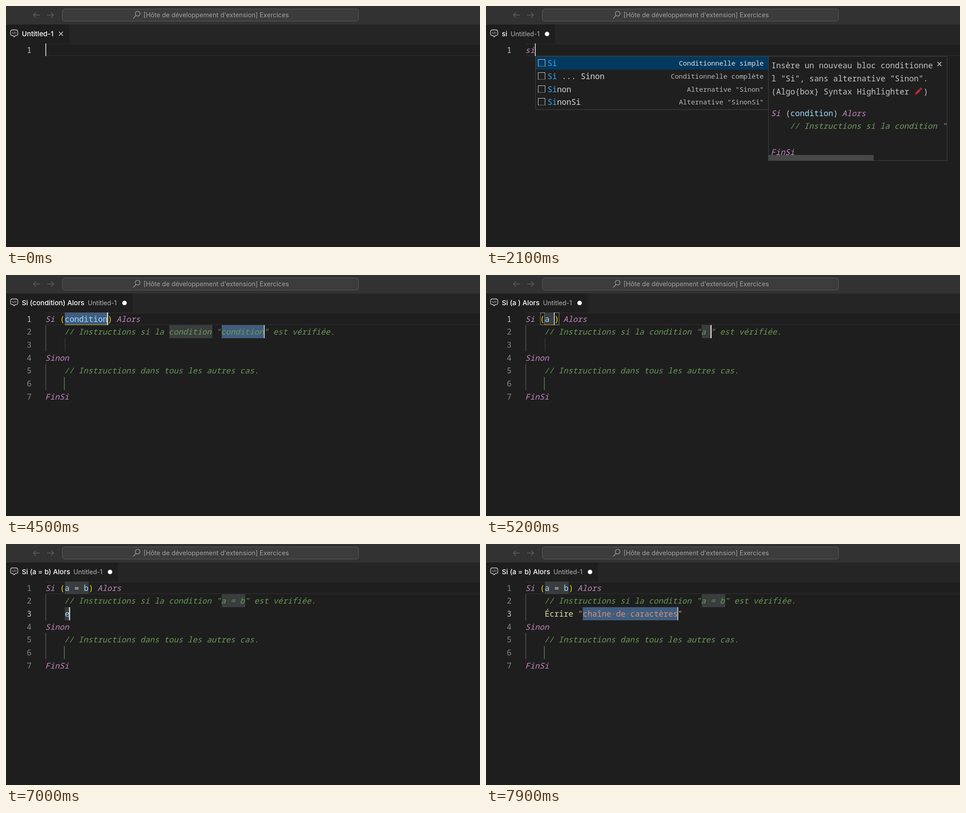
Write an HTML page that moves like this. It is 1048 px wide and 534 px high and loops after 8 s.

```html
<!DOCTYPE html>
<html lang="fr">
<head>
<meta charset="utf-8">
<title>Si … Sinon</title>
<style>
  html, body { margin: 0; width: 100%; height: 100%; overflow: hidden; background: #1e1e1e; }
  body { position: relative; font: 17.5px/28.7px "Noto Sans Mono", monospace; color: #d4d4d4; }
  div { position: absolute; box-sizing: border-box; white-space: pre; }
  svg { position: absolute; left: 0; top: 0; fill: none; }
  .bar { left: 0; top: 0; width: 1048px; height: 41px; background: #323233; }
  .search { left: 124px; top: 6px; width: 656px; height: 28px; border: 1px solid #5a5a5a; border-radius: 6px;
    background: #3c3c3c; padding-left: 179px; font: 14.2px/26px Inter, sans-serif; color: #a2a2a2; }
  .tabs { left: 0; top: 41px; width: 1048px; height: 42px; background: #252526; }
  .tab { left: 0; top: 0; height: 42px; padding: 0 12px 0 35px; background: #1e1e1e; display: flex;
    align-items: center; font: 450 15.2px/42px Inter, sans-serif; color: #fff; }
  .tab small { font-size: 14.1px; font-weight: 400; color: #b4b4b4; margin-left: 7.5px; }
  .tab svg { position: static; margin-left: 11px; }
  .current { border: solid #282828; border-width: 2px 0; }
  .num { text-align: right; color: #858585; }
  .on { color: #c6c6c6; }
  .k, .c { font-style: italic; font-weight: 500; position: relative; left: -1.2px; }
  .k { color: #c586c0; }
  .c { color: #6a9955; }
  .docs .c { color: #739c60; }
  .v { color: #9cdcfe; font-style: normal; }
  .f { color: #dcdcaa; font-style: normal; }
  .s { color: #ce9178; font-style: normal; }
  .p { font-style: normal; }
  .code .p { color: #ffd700; }
  .dot { color: #7d7f86; font-style: normal; }
  .field { background: #3a3d3e; }
  .picked { background: #405d7e; }
  .guide { background: #454545; }
  .stop { background: #4b6b48; }
  .gold { background: #c9ab12; }
  .pair { border: 1px solid #888; }
  .cursor { background: #c4c4c0; }
  .list, .docs { background: #1f1f1f; border: 1px solid #454545; overflow: hidden; }
  .list { border-radius: 3px 0 0 3px; }
  .item { color: #d8d8d8; line-height: 28px; }
  .item.sel { background: #04395e; color: #fff; }
  .item em { font-style: normal; font-weight: 500; color: #2fa6f5; }
  .item span { position: absolute; left: 26px; }
  .item u { position: absolute; left: 5px; top: 6px; width: 16px; height: 16px; box-sizing: border-box;
    border: 1.5px solid #d0d0d0; border-bottom-style: dotted; }
  .item small { position: absolute; right: 11px; font-size: 14.9px; color: #b8b8b8; }
  .item.sel small { color: #e4e4e4; }
  .docs { width: 396px; padding: 5px 0 4.3px 6px; color: #c4c4c4; }
  .docs p { margin: 0 0 19.3px; width: 361px; white-space: pre-wrap; word-break: break-all; }
  .docs .crayon { position: relative; top: -2px; vertical-align: middle; }
  .docs .close { left: 372px; top: 11px; }
  .scroll { left: 0; bottom: 0; width: 232px; height: 12px; background: rgba(78, 78, 78, .85); }
</style>
</head>
<body>
<div class="bar">
  <div class="search">[Hôte de développement d'extension] Exercices</div>
  <svg width="400" height="41" stroke="#606060" stroke-width="1.3">
    <path d="M75 20H60.5M66.5 14l-6 6 6 6M91 20h14.5M99.5 14l6 6-6 6"/>
    <g stroke="#a2a2a2"><circle cx="291" cy="17" r="5.3"/><path d="M287.3 21l-6 6.5"/></g>
  </svg>
</div>
<div class="tabs">
  <div class="tab" id="tab"></div>
  <svg width="32" height="42" stroke="#d8d8d8" stroke-width="1.3">
    <path d="M14.5 12h7q4.500 0 4.500 4.500v4q0 4-4 4h-1.500l-2.500 3-2.500-3h-1.500q-4 0-4-4v-4q0-4.500 4.500-4.500z"/>
    <path d="M15.5 16.5l-2 2 2 2M20.5 16.5l2 2-2 2M18.8 16l-1.6 5" stroke-width="1"/>
  </svg>
</div>
<div id="editor"></div>
<script>
const LOOP = 8000, CW = 10.5, LH = 28.7;
const X = col => 88 + CW * col, Y = row => 82.5 + LH * row;

// Each key press restarts the caret blink; idle steps leave it running.
const steps = [
  { t: -200, typed: '' },
  { t: 1700, typed: 's' },
  { t: 1900, typed: 's', menu: 'si', idle: true },
  { t: 2100, typed: 'si', menu: 'si' },
  { t: 2800, typed: 'si', menu: 'si', pick: 1, idle: true },
  { t: 4000, cond: 'condition' },
  { t: 4300, cond: 'condition' },
  { t: 4800, cond: 'a' },
  { t: 4900, cond: 'a', menu: 'algo', idle: true },
  { t: 5200, cond: 'a ' },
  { t: 5400, cond: 'a =' },
  { t: 5900, cond: 'a = ' },
  { t: 6000, cond: 'a = b' },
  { t: 6200, cond: 'a = b', third: '' },
  { t: 7000, cond: 'a = b', third: 'e' },
  { t: 7100, cond: 'a = b', third: 'e', menu: 'write', idle: true },
  { t: 7500, cond: 'a = b', third: 'Écrire "chaîne de caractères"' },
];

const ifPart = 'Si (condition) Alors\n    // Instructions si la condition "condition" est vérifiée.\n\n';
const elsePart = 'Sinon\n    // Instructions dans tous les autres cas.\n\n';
const menus = {
  si: [
    ['Si', 'Conditionnelle simple',
      'Insère un nouveau bloc conditionnel "Si", sans alternative "Sinon".', ifPart + 'FinSi'],
    ['Si ... Sinon', 'Conditionnelle complète',
      'Insère un nouveau bloc conditionnel complet "Si" avec son alternative "Sinon".', ifPart + elsePart + 'FinSi'],
    ['Sinon', 'Alternative "Sinon"'],
    ['SinonSi', 'Alternative "SinonSi"'],
  ],
  algo: [
    ['Algorithme', 'Structure de base', 'Insère la structure de base d\'un nouvel algorithme.',
      'Variables\n\nDébut\n    // Instructions à exécuter dans cet algorithme.\n\n\nFin'],
    ['Alors', 'Mot-clé'],
  ],
  write: [
    ['Écrire', 'Affichage', 'Insère une nouvelle instruction qui affiche une chaîne de caractères à l\'écran.',
      'Écrire "chaîne de caractères"'],
  ],
};

const crayon = '<svg class="crayon" width="21" height="20"><path d="M4 16L17 3" stroke="#b92b3c" ' +
  'stroke-width="5"/><path d="M1 19l4-4M12 4l4 4" stroke="#6d1522" stroke-width="2"/></svg>';
const cross = '<svg class="close" width="12" height="12" stroke="#ddd" stroke-width="1.4"><path d="M1 1l9 9M10 1l-9 9"/></svg>';
const disc = '<svg width="12" height="12"><circle cx="6" cy="6" r="5" fill="#fff"/></svg>';

const box = (x, y, w, h, cls, html = '') =>
  `<div class="${cls}" style="left:${x}px;top:${y}px;width:${w}px;height:${h}px">${html}</div>`;
const mark = (col, row, len, cls) => box(X(col), Y(row), len * CW, LH, cls);

const token = /(\/\/.*)|("[^"]*")|\b(SinonSi|Sinon|Si|Alors|FinSi|Variables|Début|Fin)\b|\b(condition|[abe])\b|(Écrire)|([()])/g;
const paint = code => code.replace(token, (text, ...groups) =>
  `<i class="${'cskvfp'[groups.slice(0, 6).findIndex(Boolean)]}">${text}</i>`);

function popup(step, col, row) {
  const items = menus[step.menu], pick = step.pick || 0;
  const typed = (step.typed || step.third || step.cond).length;
  const [, , about, code] = items[pick];
  const rows = items.map(([label, detail], i) => box(0, i * LH, 515, LH, i === pick ? 'item sel' : 'item',
    `<u></u><span><em>${label.slice(0, typed)}</em>${label.slice(typed)}</span><small>${detail}</small>`));
  const text = about + ' (Algo{box} Syntax Highlighter ' + crayon + ')';
  const wide = code.split('\n').some(l => l.length > 36);
  const x = X(col), y = Y(row + 1);
  return box(x, y, 516, items.length * LH + 4, 'list', rows.join('')) +
    `<div class="docs" style="left:${x + 515}px;top:${y}px"><p>${text}</p>${paint(code)}` +
    (wide ? '<div class="scroll"></div>' : '') + cross + '</div>';
}

function draw(step, blink) {
  const { cond, third, typed } = step;
  const inBody = third !== undefined, started = cond !== undefined;
  const row = inBody ? 2 : 0;
  let lines = [''], under = '', over = '', carets, title = typed;

  if (started) {
    const n = cond.length, full = cond === 'condition', field = full ? 'picked' : 'field';
    title = `Si (${cond}) Alors`;
    lines = [
      paint(title),
      paint(`    // Instructions si la condition "${cond}" est vérifiée.`),
      paint('    ' + (third || '')),
      paint('Sinon'),
      paint('    // Instructions dans tous les autres cas.'),
      '',
      paint('FinSi'),
    ];
    under += mark(4, 0, n, field) + mark(37, 1, n, field);
    if (full) under += mark(26, 1, 9, 'field');
    for (const r of [1, 4]) under += box(87, Y(r), 1.5, 2 * LH, 'guide');
    under += box(128, Y(5), 2, LH, 'stop');
    carets = [[4 + n, 0], [37 + n, 1]];
    if (!inBody) {
      over += box(X(4), 109.5, n * CW, 1.2, 'gold');
      if (!full) over += mark(3, 0, 1, 'pair') + mark(4 + n, 0, 1, 'pair');
    }
    if (!third) under += box(129.5, Y(2), 1.5, LH, 'guide');
    if (inBody) {
      carets = [[4 + third.length, 2]];
      if (third === 'e') under += mark(4, 2, 1, 'field');
      if (third.length > 1) {
        carets = [[32, 2]];
        under += mark(12, 2, 20, 'picked');
        lines[2] = lines[2].replace(/ (?=de|car)/g, '<i class="dot">·</i>');
      }
    }
  } else {
    carets = [[typed.length, 0]];
    if (typed) lines[0] = `<i class="k">${typed}</i>`;
  }

  const code = lines.map((html, i) =>
    box(X(0), Y(i), 900, LH, 'code', html) +
    box(16, Y(i), 40.5, LH, i === row ? 'num on' : 'num', i + 1)).join('');
  if (blink) over += carets.map(([c, r]) => box(X(c) - 1.2, Y(r), 2.4, LH, 'cursor')).join('');
  if (step.menu) over += popup(step, carets[0][0], row);

  document.getElementById('editor').innerHTML = box(88, 83, 960, 28, 'current') + under + code + over;
  document.getElementById('tab').innerHTML = title ? `${title}<small>Untitled-1</small>${disc}` : 'Untitled-1' + cross;
}

let shown;
const start = performance.now();
function tick() {
  const t = (performance.now() - start) % LOOP;
  const past = steps.filter(s => s.t <= t);
  const step = past[past.length - 1];
  const key = past.filter(s => !s.idle).pop();
  const blink = Math.floor((t - key.t) / 500) % 2 === 0;
  const state = step.t + '/' + blink;
  if (state !== shown) draw(step, blink);
  shown = state;
  requestAnimationFrame(tick);
}
tick();
</script>
</body>
</html>
```
